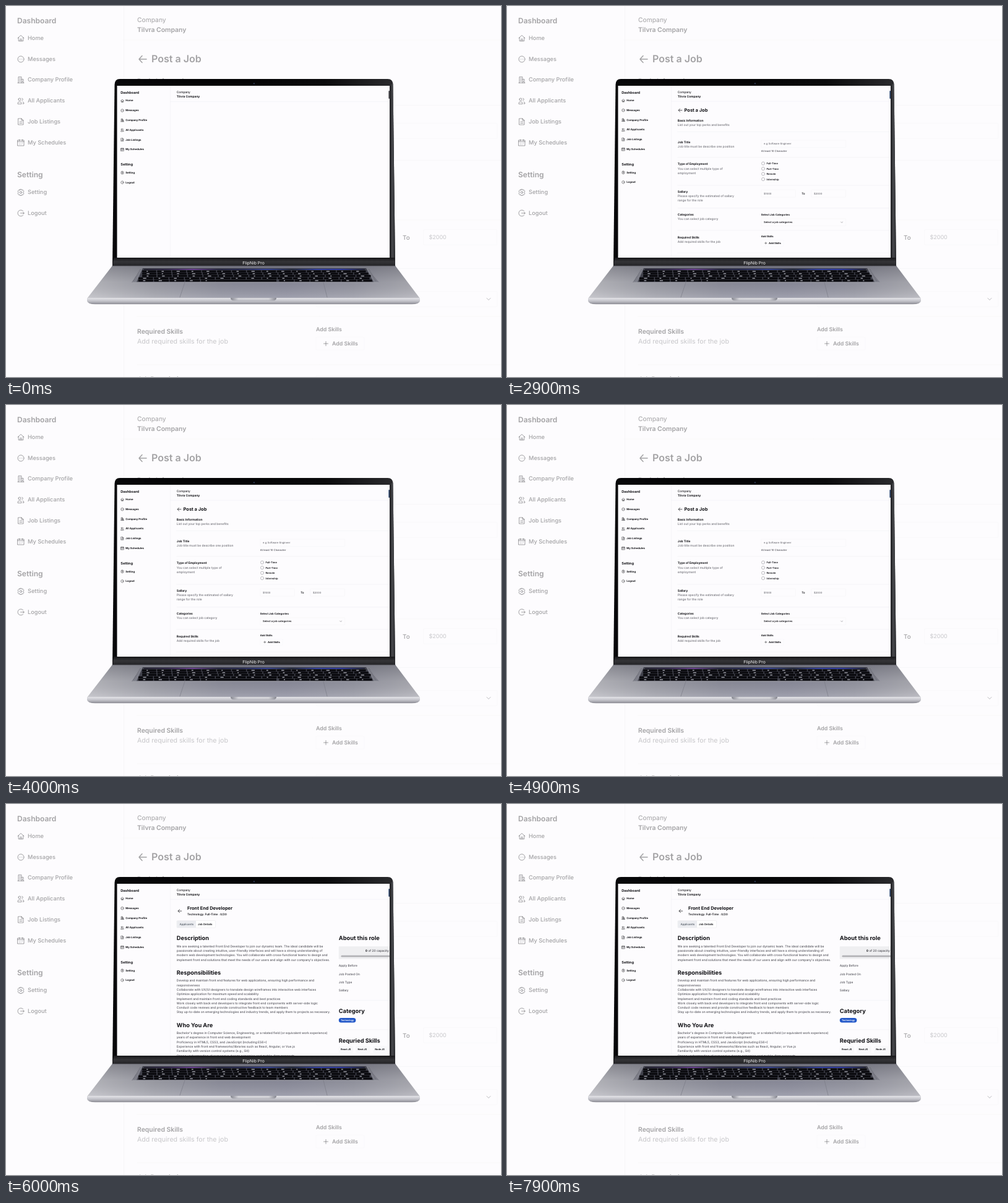
Write an HTML page with a canvas that moves like this. It is 800 px wide and 600 px high and loops after 8 s.

```html
<!DOCTYPE html>
<html lang="en">
<head>
<meta charset="utf-8">
<title>Job dashboard on a laptop</title>
<style>
  html, body { margin: 0; width: 100%; height: 100%; overflow: hidden; background: #fdfcfe; }
  canvas { display: block; width: 800px; height: 600px; }
</style>
</head>
<body>
<canvas id="stage" width="800" height="600"></canvas>
<script>
const ctx = document.getElementById('stage').getContext('2d');
const LOOP = 8000, FORM_AT = 2900, JOB_AT = 6000;
const PAPER = '#fdfcfe', INK = '#121216', SOFT = '#707077', LINE = '#ececf0', BORDER = '#f1f1f4';
const LEFT = 212, FIELD = 501, ASIDE = 773, RIGHT = 950;
let extraWeight = 0;   // small text on the laptop needs heavier strokes

// y is the middle of the capital letters.
function text(str, x, y, size, weight = 400, color = INK, align = 'left') {
  ctx.font = `${weight + extraWeight} ${size}px Inter, sans-serif`;
  ctx.textAlign = align;
  ctx.fillStyle = color;
  ctx.fillText(str, x, y + size * 0.36);
}

function stroke(path, x = 0, y = 0, color = INK, width = 1) {
  ctx.save();
  ctx.translate(x, y);
  ctx.strokeStyle = color;
  ctx.lineWidth = width;
  ctx.lineCap = ctx.lineJoin = 'round';
  ctx.stroke(new Path2D(path));
  ctx.restore();
}

function fill(path, color) {
  ctx.fillStyle = color;
  ctx.fill(new Path2D(path));
}

function box(x, y, w, h, r, color, border) {
  ctx.beginPath();
  ctx.roundRect(x, y, w, h, r);
  if (color) { ctx.fillStyle = color; ctx.fill(); }
  if (border) { ctx.strokeStyle = border; ctx.lineWidth = 1; ctx.stroke(); }
}

function gradient(x0, y0, x1, y1, ...colors) {
  const g = ctx.createLinearGradient(x0, y0, x1, y1);
  colors.forEach((c, i) => g.addColorStop(i / (colors.length - 1), c));
  return g;
}

const rule = (y, x = LEFT, end = RIGHT) => stroke(`M${x} ${y}H${end}`, 0, 0, LINE);
const backArrow = (x, y) => stroke('M6 0H-6M-1 -5.5L-6 0L-1 5.5', x, y, INK, 1.5);

// Icons are centred on the origin.
const ring = r => `M${r} 0A${r} ${r} 0 1 1 ${-r} 0A${r} ${r} 0 1 1 ${r} 0`;
const ICONS = {
  home: 'M-5 0L0 -4.6L5 0M-3.8 -1V4.6H3.8V-1M-1.2 4.6V1.4H1.2V4.6',
  message: ring(5) + 'M-2.4 0h.1M0 0h.1M2.3 0h.1',
  building: 'M-5 4.8H5M-4 4.8V-4.8H1V4.8M1 -1H4V4.8M-2.4 -2.5H-.6M-2.4 0H-.6M-2.4 2.4H-.6M2.4 1.5V3',
  people: 'M-4 -2.5a2 2 0 1 0 4 0a2 2 0 1 0 -4 0M-5 4.5V3.5Q-5 1.4 -2 1.4T1 3.5V4.5ZM1.8 -4.3a1.9 1.9 0 0 1 0 3.7M3 1.4Q5 1.8 5 4.5H3',
  file: 'M-4 -5H1L4 -2V5H-4ZM1 -5V-2H4M-2 0H2M-2 2.5H2',
  calendar: 'M-5 -4H5V5H-5ZM-5 -1.7H5M-2.5 -5V-3M2.5 -5V-3M-2.6 .8h.1M0 .8h.1M2.5 .8h.1M-2.6 3h.1M0 3h.1',
  gear: ring(1.7) + 'M-1.2 -5H1.2L1.7 -3.6L3.4 -4L4.8 -1.8L4 0L4.8 1.8L3.4 4L1.7 3.6L1.2 5H-1.2L-1.7 3.6L-3.4 4L-4.8 1.8L-4 0L-4.8 -1.8L-3.4 -4L-1.7 -3.6Z',
  logout: 'M3.6 -3.5A5 5 0 1 0 3.6 3.5M-.5 0H5.2M3.6 -1.6L5.2 0L3.6 1.6'
};
const NAV = [
  ['home', 'Home', 51.5], ['message', 'Messages', 85.5], ['building', 'Company Profile', 119],
  ['people', 'All Applicants', 153], ['file', 'Job Listings', 186.5], ['calendar', 'My Schedules', 220.5],
  ['gear', 'Setting', 301], ['logout', 'Logout', 334.5]
];

function shell() {
  stroke('M190.5 0V600', 0, 0, LINE);
  text('Dashboard', 18, 24, 12, 600);
  text('Setting', 18, 273, 12.1, 600);
  for (const [icon, label, y] of NAV) {
    stroke(ICONS[icon], 24, y + 0.5);
    text(label, 35, y, 9.2, 550);
  }
  text('Company', LEFT, 22.5, 10.3);
  text('Tilvra Company', LEFT, 38, 10.4, 600);
  rule(55, 190);
}

function section(title, y, ...notes) {
  text(title, LEFT, y, 10.4, 600);
  notes.forEach((note, i) => text(note, LEFT, y + 16 + i * 15, 10.6, 400, SOFT));
}

function field(x, y, w, value, color = SOFT, weight = 400) {
  box(x, y, w, 25, 2, null, BORDER);
  text(value, x + 9, y + 12.5, 9, weight, color);
}

function formPage() {
  backArrow(221, 86);
  text('Post a Job', 235, 85, 16, 600);
  section('Basic Information', 121, 'List out your top perks and benefits');
  section('Job Title', 196, 'Job title must be describe one position');
  section('Type of Employment', 271.5, 'You can select multiple type of', 'employment');
  section('Sallary', 367.5, 'Please specify the estimated of sallary', 'range for the role');
  section('Categories', 446.5, 'You can select job category');
  section('Required Skills', 526, 'Add required skills for the job');
  section('Job Description', 603);
  [160.5, 249.5, 346, 424.5, 502, 580].forEach(y => rule(y));

  field(FIELD, 189.5, 293, 'e.g Software Engineer');
  text('At least 10 Character', FIELD, 226, 9, 400, '#505058');
  ['Full-Time', 'Part-Time', 'Remote', 'Internship'].forEach((kind, i) => {
    const y = 270 + i * 18.2;
    stroke(ring(5.5), 508, y, '#77777e');
    text(kind, 519.5, y, 8.8, 500);
  });
  field(FIELD, 361.5, 119, '$1000');
  field(674.5, 361.5, 119, '$2000');
  text('To', 641, 374.5, 9.8, 500);
  text('Select Job Categories', FIELD, 446.5, 9.2, 600);
  field(FIELD, 461.5, 293, 'Select a job categories', INK, 500);
  stroke('M-3 -1.5L0 1.5L3 -1.5', 780, 474, '#505058');
  text('Add Skills', FIELD, 522.5, 8.8, 600);
  box(FIELD, 535.5, 78, 21, 2, null, '#f5f5f8');
  stroke('M-3.5 0H3.5M0 -3.5V3.5', 517, 546);
  text('Add Skills', 527, 545.5, 8.8, 600);
  box(FIELD, 597.5, 300, 40, 2, null, BORDER);
}

const ARTICLE = [
  ['Description', 189.5, 217.5, [
    'We are seeking a talented Front End Developer to join our dynamic team. The ideal candidate will be',
    'passionate about creating intuitive, user-friendly interfaces and will have a strong understanding of',
    'modern web development technologies. You will collaborate with cross-functional teams to design and',
    'implement front end solutions that meet the needs of our users and align with our company\'s objectives.']],
  ['Responsibilities', 308.5, 336.5, [
    'Develop and maintain front end features for web applications, ensuring high performance and',
    'responsiveness',
    'Collaborate with UX/UI designers to translate design wireframes into interactive web interfaces',
    'Optimize application for maximum speed and scalability',
    'Implement and maintain front end coding standards and best practices',
    'Work closely with back end developers to integrate front end components with server-side logic',
    'Conduct code reviews and provide constructive feedback to team members',
    'Stay up-to-date on emerging technologies and industry trends, and apply them to projects as necessary.']],
  ['Who You Are', 490, 518, [
    'Bachelor\'s degree in Computer Science, Engineering, or a related field (or equivalent work experience)',
    'years of experience in front end web development',
    'Proficiency in HTML5, CSS3, and JavaScript (including ES6+)',
    'Experience with front end frameworks/libraries such as React, Angular, or Vue.js',
    'Familiarity with version control systems (e.g., Git)',
    'Strong understanding of responsive design principles and mobile-first approach']]
];

function jobPage() {
  backArrow(223, 95.5);
  text('Front End Developer', 249, 84.5, 15.8, 600);
  text('Technology. Full-Time . 0/20', 249, 106, 9.9, 500);
  box(212.5, 128.5, 134, 25, 3, '#fff', '#e2e2e6');
  box(213, 129, 66, 24, 2, '#ebecf0');
  text('Applicants', 222, 141, 9.4, 500, '#5a626c');
  text('Job Details', 285, 141, 9.4, 500);

  for (const [title, titleY, firstY, lines] of ARTICLE) {
    text(title, LEFT, titleY, 19.8, 600);
    lines.forEach((line, i) => text(line, LEFT, firstY + i * 15.6, 10.65, 400, '#55555c'));
  }

  text('About this role', ASIDE, 189.5, 19.8, 600);
  box(ASIDE, 218, 190, 44, 2, '#efeff1');
  text('0', 865, 233, 10.4, 600);
  text('of 20 capacity', 875, 233, 10.4, 400, '#45454c');
  box(781, 249, 190, 6, 3, '#b2b2b6');
  ['Apply Before', 'Job Posted On', 'Job Type', 'Sallary'].forEach((label, i) =>
    text(label, ASIDE, 285 + i * 28.5, 10.4, 400, '#505058'));
  rule(405, ASIDE);
  text('Category', ASIDE, 442, 19.8, 600);
  box(ASIDE, 466, 59, 16, 8, '#2459c9');
  text('Technology', ASIDE + 29.5, 474, 8, 500, '#fff', 'center');
  rule(506, ASIDE);
  text('Requried Skills', ASIDE, 544, 19.8, 600);
  ['React JS', 'Next JS', 'Node JS'].forEach((skill, i) => {
    box(ASIDE + i * 59, 563, 50, 24, 3, '#f8f8fa');
    text(skill, 780 + i * 59, 575, 8.2, 600);
  });
}

function keyboard() {
  fill('M219 424H584L603 447H203Z', '#7e7f89');
  fill('M221 424H582L594 446.5H211Z', '#41424c');
  ctx.fillStyle = gradient(222, 0, 582, 0, '#20202b', '#30254a', '#70409a', '#23233e', '#272a55', '#34429a', '#202638', '#3140a8', '#2c38a8', '#20202a');
  ctx.fillRect(223, 425, 357, 1.8);
  for (let row = 0; row < 5; row++) {
    const y = 427.6 + row * 3.75, x0 = 220 - row * 2, step = (363 + row * 4) / 15;
    for (let key = 0; key < 15; key++) {
      if (row === 4 && key > 4 && key < 9) continue;
      const x = x0 + key * step + row % 3 * 2;
      box(x, y, step - 1.4, 3.2, 0.7, '#0a0a0e');
      ctx.fillStyle = '#a9aab4';
      ctx.fillRect(x + step * 0.3, y + 0.9, 2 + (key * 7 + row * 3) % 5 * 0.8, 1.3);
    }
  }
  ctx.fillStyle = '#0a0a0e';
  ctx.fillRect(339, 442.6, 98, 3.2);
  stroke('M205 447H602', 0, 0, '#a5a6ae', 0.8);
  ctx.fillStyle = '#62636c';
  for (let i = 0; i < 9; i++) {
    ctx.fillRect(216 - i * 1.3, 426 + i * 2.2, 1.6, 0.8);
    ctx.fillRect(586 + i * 1.3, 426 + i * 2.2, 1.6, 0.8);
  }
}

function laptop() {
  fill('M172 420L175.5 127Q175.8 118 184 118H617Q625.2 118 625.5 127L629 420Z',
    gradient(172, 0, 629, 0, '#08080a', '#050506', '#050506', '#0b0b0c', '#2b2b2e'));
  fill('M620 129L625.4 125L629 420H620Z', gradient(620, 0, 629, 0, '#1b1b1e', '#47484c', '#26272a'));
  fill('M174 407H628L628.8 420H172.3Z', gradient(0, 407, 0, 420, '#171719', '#343437', '#242427'));
  fill('M399.6 125.5a1.3 1.3 0 1 0 2.6 0a1.3 1.3 0 1 0 -2.6 0', '#29344c');
  text('FlipNib Pro', 400, 415.3, 6.9, 400, '#f4f4f5', 'center');

  const deck = 'M172 420H629L669 473H131Z';
  fill(deck, gradient(131, 0, 669, 0, '#c2c2c7', '#a3a4ac', '#9293a0', '#9091a0', '#9a9ba6', '#b4b4ba'));
  fill(deck, gradient(0, 420, 0, 473, 'rgba(60,61,72,.4)', 'rgba(60,61,72,.12)', 'rgba(225,225,232,.22)'));
  stroke('M172 420.3H629', 0, 0, '#4c4d54', 0.8);
  keyboard();
  stroke('M289 447L281 471M513 447L519 471', 0, 0, '#7c7d87', 0.7);
  fill('M131 472H669V477Q668 482.3 656 482.3H144Q132 482.3 131 477Z',
    gradient(0, 472, 0, 482.3, '#e2e2e6', '#cfcfd5', '#b4b4bb', '#85858d'));
  fill('M363 472H437Q437 476.3 432 476.3H368Q363 476.3 363 472Z',
    gradient(363, 0, 437, 0, '#85868f', '#d2d2d7', '#d4d4d9', '#d4d4d9', '#d4d4d9', '#d2d2d7', '#85868f'));
  stroke('M366 476H434', 0, 0, '#a2a2aa', 0.7);
}

function screen(time) {
  const empty = time < FORM_AT;
  ctx.save();
  ctx.beginPath();
  ctx.rect(179.5, 129, 440.5, 278);
  ctx.clip();
  ctx.fillStyle = PAPER;
  ctx.fillRect(179, 129, 442, 279);
  ctx.translate(176.8, empty ? 128.9 : 128.5);
  ctx.scale(0.467, 0.467);
  extraWeight = 100;
  shell();
  if (!empty) (time < JOB_AT ? formPage : jobPage)();
  extraWeight = 0;
  ctx.restore();
  box(618.3, 137, 1.7, 13, 0.8, empty ? '#505055' : '#334a70');
}

function draw() {
  const time = performance.now() % LOOP;
  ctx.textRendering = 'geometricPrecision';
  ctx.fillStyle = PAPER;
  ctx.fillRect(0, 0, 800, 600);
  ctx.globalAlpha = 0.38;
  shell();
  formPage();
  ctx.globalAlpha = 1;
  laptop();
  screen(time);
  requestAnimationFrame(draw);
}
draw();
</script>
</body>
</html>
```
